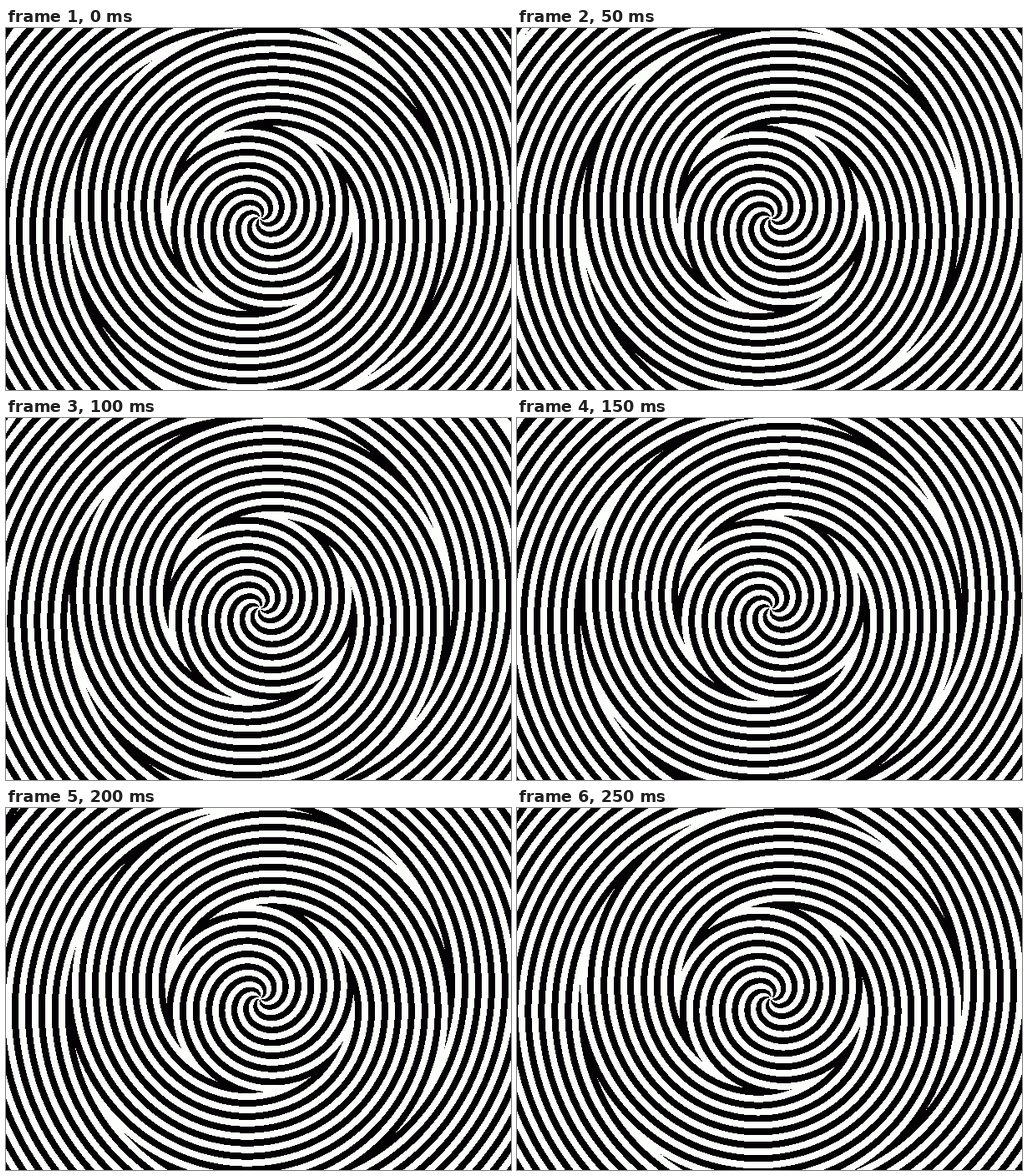
Write an HTML page with a canvas that moves like this. It is 605 by 434 pixels and loops after 0.3 s.

```html
<!DOCTYPE html>
<html lang="en">
<head>
<meta charset="utf-8">
<title>Spiral</title>
<style>
  html, body { margin: 0; width: 100%; height: 100%; overflow: hidden; background: #040104; }
  canvas { display: block; width: 605px; height: 434px; }
</style>
</head>
<body>
<canvas id="stage" width="605" height="434"></canvas>
<script>
const W = 605, H = 434;
const CX = 304.3, CY = 228.2;
const TAU = Math.PI * 2;
const ARMS = 6;
const PITCH = 16;                 // radial distance between stripes
const R1 = 112, R2 = 229, R3 = 367.4; // radii where the spiral reverses
const OFFSET = -64 / 360;         // in turns of one stripe
const STEPS = 6, STEP_MS = 50;

const ctx = document.getElementById('stage').getContext('2d');
const img = ctx.createImageData(W, H);
const pixels = new Uint32Array(img.data.buffer);
const BLACK = 0xff040104, WHITE = 0xfffcfffd; // ABGR

// Radius folded back and forth at each reversal.
function fold(r) {
  if (r < R1) return r - R1 + (R2 - R1);
  if (r < R2) return R2 - r;
  if (r < R3) return r - R2;
  return 2 * R3 - R2 - r;
}

// Stripe phase of every pixel, in turns.
const phase = new Float32Array(W * H);
for (let y = 0; y < H; y++) {
  for (let x = 0; x < W; x++) {
    const dx = x + 0.5 - CX, dy = y + 0.5 - CY;
    const r = Math.hypot(dx, dy);
    const angle = Math.atan2(-dy, dx) / TAU;
    phase[y * W + x] = r < 2.2 ? NaN : fold(r) / PITCH - ARMS * angle + OFFSET;
  }
}

function draw(turn) {
  for (let i = 0; i < phase.length; i++) {
    const p = phase[i] + turn + 0.25;
    pixels[i] = p - Math.floor(p) >= 0.5 ? BLACK : WHITE;
  }
  ctx.putImageData(img, 0, 0);
}

let shown = -1;
function tick() {
  const step = Math.floor(performance.now() / STEP_MS) % STEPS;
  if (step !== shown) {
    shown = step;
    draw(step / STEPS);
  }
  requestAnimationFrame(tick);
}
tick();
</script>
</body>
</html>
```
